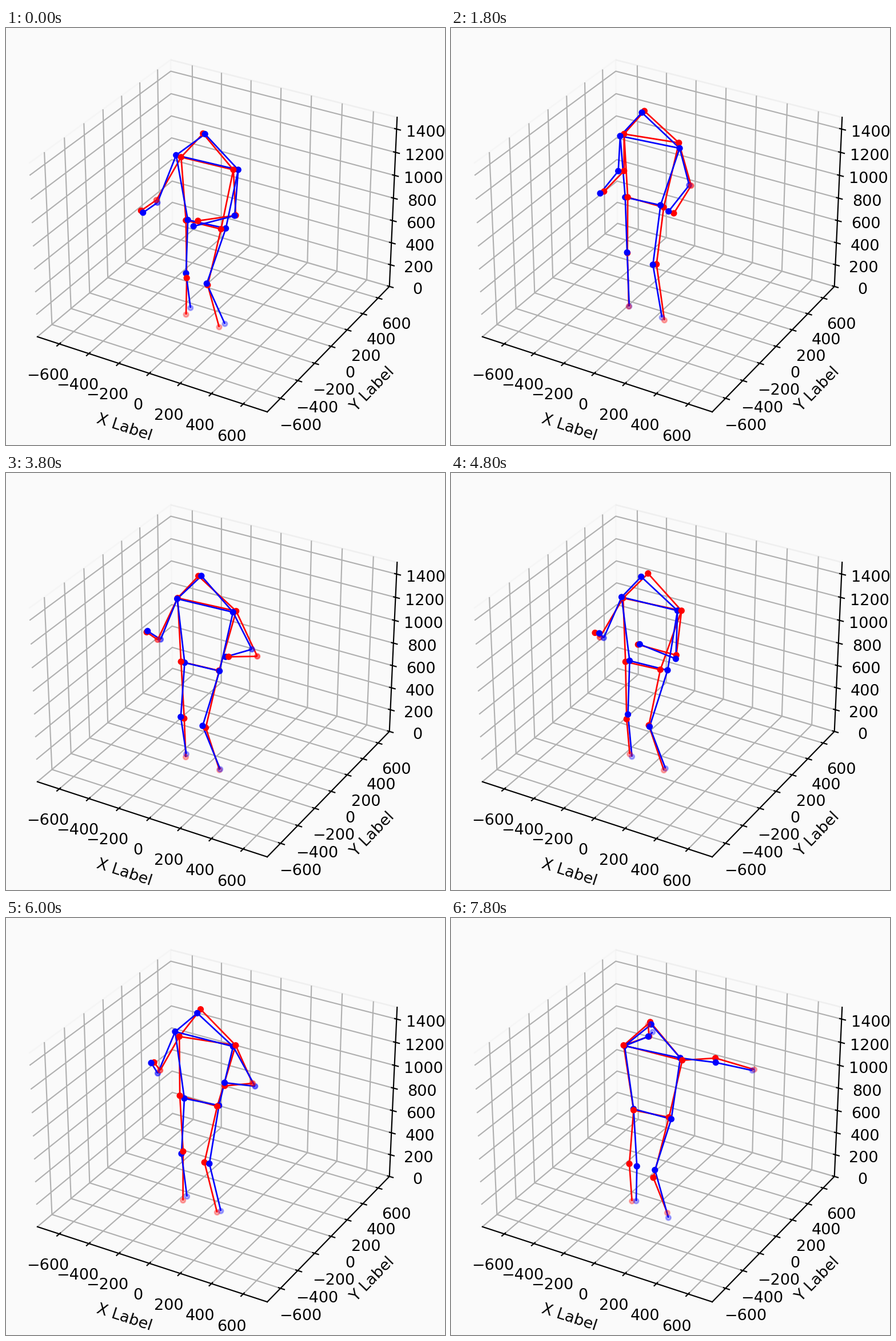
Write a matplotlib script that moves like this. It is 768 by 729 pixels and loops after 8 s.

```python
import numpy as np
import matplotlib.pyplot as plt
from matplotlib.animation import FuncAnimation
from matplotlib.collections import LineCollection

W, H, DPI = 768, 729, 194
FRAMES, STEP = 40, 200
BG = "#fafafa"
FAR, MID = 0.3, 0.51   # marker opacity of distant joints

# standing joint: x, y, then shift when crouched and share of the sideways sway
BODY = {
    "head": (339, 136, 2, 50, 1.0),
    "l_shoulder": (300, 177, 0, 48, 0.3),
    "r_shoulder": (400, 194, 0, 55, 0.3),
    "l_hip": (310, 285, 1, 52, 1.0),
    "r_hip": (372, 301, 3, 51, 1.0),
    "l_knee": (312, 382, -2, 52, 1.0),
    "r_knee": (363, 404, -17, 45, 1.0),
    "l_foot": (312, 484, 4, 11, 0.5),
    "r_foot": (372, 505, 3, 15, 0.5),
}
NAMES = [*BODY, "l_elbow", "l_hand", "r_elbow", "r_hand"]
ID = {name: n for n, name in enumerate(NAMES)}

BONES = [("head", "l_shoulder"), ("head", "r_shoulder"),
         ("l_shoulder", "r_shoulder"), ("l_hip", "r_hip")]
for side in "lr":
    for a, b in (("shoulder", "hip"), ("shoulder", "elbow"), ("elbow", "hand"),
                 ("hip", "knee"), ("knee", "foot")):
        BONES.append((f"{side}_{a}", f"{side}_{b}"))
BONES = [[ID[a], ID[b]] for a, b in BONES]

# key frames: crouch depth, sway in pixels, and the arm vectors
# (left upper arm, left forearm, right upper arm, right forearm)
CROUCH = {0: 0.97, 4: -0.1, 6: 0, 9: 0.2, 13: 1.07, 19: 0.87, 24: 0.84,
          27: 0.05, 30: 0.53, 33: 0.4, 36: 0.9, 39: 0.95}
SWAY = {0: 5, 6: -4, 19: -2, 30: -3, 39: 8}
ARMS = {
    0: [(-38, 79), (-26, 18), (-1, 80), (-69, 14)],
    6: [(-8, 70), (-38, 28), (21, 76), (-56, 36)],
    13: [(8, 52), (-26, 52), (16, 60), (2, 64)],
    16: [(-10, 62), (-20, 15), (52, 35), (48, 19)],
    19: [(-32, 72), (-21, -14), (35, 72), (-48, 7)],
    24: [(-36, 70), (-8, -8), (-6, 81), (-65, -22)],
    30: [(-32, 66), (-11, -16), (34, 68), (-51, -1)],
    36: [(5, 60), (15, -25), (34, 56), (-5, -13)],
    39: [(43, -16), (3, -14), (60, 2), (66, 17)],
}

rng = np.random.default_rng(4)
spread = rng.normal(0, 2.6, (FRAMES, len(NAMES), 2))
red_above = rng.random((FRAMES, len(NAMES))) < 0.4


def ease(keys, i):
    """Smooth value between the key frames around frame i."""
    a = max(f for f in keys if f <= i)
    b = min(f for f in keys if f >= i)
    t = (i - a) / max(b - a, 1)
    t = t * t * (3 - 2 * t)
    return (1 - t) * np.array(keys[a]) + t * np.array(keys[b])


def pose(i):
    """Joint positions and marker opacities."""
    crouch, sway, arms = (ease(k, i) for k in (CROUCH, SWAY, ARMS))
    pts = [(x + dx * crouch + share * sway, y + dy * crouch)
           for x, y, dx, dy, share in BODY.values()]
    alpha = np.ones(len(NAMES))
    alpha[[ID["l_foot"], ID["r_foot"]]] = FAR
    for side, (upper, fore) in zip("lr", (arms[:2], arms[2:])):
        elbow = pts[ID[f"{side}_shoulder"]] + upper
        pts += [elbow, elbow + fore]
        if 2 * fore[0] + fore[1] > -10:      # hand points away from the viewer
            alpha[ID[f"{side}_hand"]] = FAR
        elif abs(upper[0]) > 7:
            alpha[ID[f"{side}_elbow"]] = MID
    return np.array(pts), alpha


# the tiny surplus keeps the pixel size from rounding down
fig = plt.figure(figsize=((W + 0.001) / DPI, (H + 0.001) / DPI), dpi=DPI,
                 facecolor=BG)

SIDE, LEFT, TOP = 716, 0.8, 0.3
box = fig.add_axes([LEFT / W, (H - TOP - SIDE) / H, SIDE / W, SIDE / H],
                   projection="3d", facecolor="none")
box.set(xlim=(-750, 750), ylim=(-750, 750), zlim=(0, 1500),
        xticks=range(-600, 601, 200), yticks=range(-600, 601, 200),
        zticks=range(0, 1401, 200), xlabel="X Label", ylabel="Y Label")
box.view_init(elev=30, azim=-60)
for axis in (box.xaxis, box.yaxis, box.zaxis):
    axis.pane.fill = False

flat = fig.add_axes([0, 0, 1, 1], facecolor="none")
flat.set(xlim=(-0.5, W - 0.5), ylim=(H - 0.5, -0.5))
flat.axis("off")
limbs = [flat.add_collection(LineCollection([], colors=c, linewidths=1, zorder=z))
         for c, z in (("red", 2), ("blue", 3))]
dots = flat.scatter([], [], s=10, linewidths=1, zorder=4)


def update(i):
    centre, alpha = pose(i)
    bodies = centre + spread[i], centre - spread[i]
    for lines, body in zip(limbs, bodies):
        lines.set_segments([body[bone] for bone in BONES])

    # 0 is red, 1 is blue; the later of a pair is drawn on top
    order = [(k, n) for n, above in enumerate(red_above[i])
             for k in ((1, 0) if above else (0, 1))]
    dots.set_offsets([bodies[k][n] for k, n in order])
    dots.set_color([(1 - k, 0, k, alpha[n]) for k, n in order])
    return [*limbs, dots]


anim = FuncAnimation(fig, update, frames=FRAMES, interval=STEP,
                     init_func=lambda: update(0), repeat=True,
                     repeat_delay=0, blit=False)
plt.show()
```
